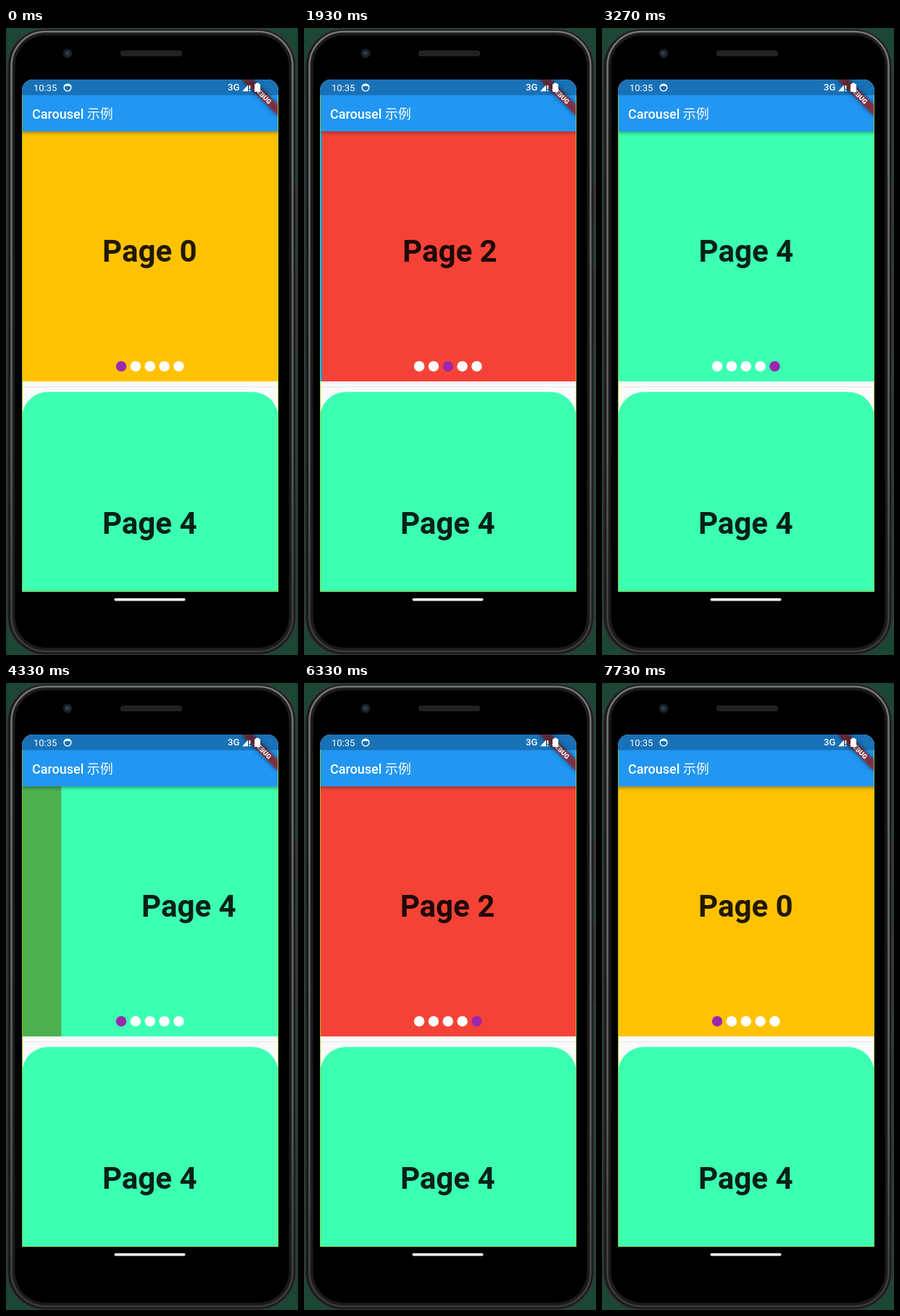
Animation, 403 px wide and 864 px high, one loop 8 s. Source, as an HTML page:

```html
<!DOCTYPE html>
<html lang="zh">
<head>
<meta charset="utf-8">
<title>Carousel</title>
<style>
  html, body { margin: 0; width: 100%; height: 100%; overflow: hidden; background: #1d4735; }
  svg { display: block; width: 403px; height: 864px; }
  text { font-family: Roboto, "Noto Sans CJK SC", "Noto Sans CJK", sans-serif; fill: #fff; }
  .page { font-size: 42px; font-weight: 700; text-anchor: middle; fill: #000; fill-opacity: .87; }
  .blur { filter: blur(3px); }
</style>
</head>
<body>
<svg viewBox="0 0 403 864">
  <defs>
    <clipPath id="view"><rect x="22" y="142" width="354" height="345"/></clipPath>
    <clipPath id="screen"><path d="M22 777V86a15 15 0 0 1 15-15H361a15 15 0 0 1 15 15V777z"/></clipPath>
    <linearGradient id="shade" x2="0" y2="1">
      <stop stop-opacity=".34"/><stop offset=".4" stop-opacity=".12"/><stop offset="1" stop-opacity="0"/>
    </linearGradient>
    <linearGradient id="metal" x2="0" y2="1">
      <stop stop-color="#77777c"/><stop offset=".7" stop-color="#5c5c60"/><stop offset="1" stop-color="#3a3a3c"/>
    </linearGradient>
    <path id="ribbon" d="M325 71H340.400L376 106.600V122z"/>
  </defs>

  <!-- phone -->
  <g fill="#3b3635">
    <rect x="398" y="217" width="5" height="56" rx="1.5"/>
    <rect x="398" y="331" width="5" height="112" rx="1.5"/>
  </g>
  <rect x="2" y="1.5" width="398" height="862" rx="52" fill="#1b1b1c" stroke="#343436" stroke-width="1.5"/>
  <rect x="7.5" y="5" width="388" height="854" rx="47" fill="none" stroke="url(#metal)" stroke-width="2.5"/>
  <rect x="12.500" y="10" width="378" height="844" rx="42"/>
  <circle cx="85" cy="35" r="6.5" fill="#1a1c20"/>
  <circle cx="85" cy="35" r="4" fill="#222c3a"/>
  <circle cx="84.5" cy="34.5" r="1.6" fill="#34506f"/>
  <rect x="158" y="31" width="85" height="8" rx="3.5" fill="#222223"/>
  <rect x="149.5" y="785.7" width="98" height="3.8" rx="1.9" fill="#f4f4f4"/>

  <g clip-path="url(#screen)">
    <rect x="22" y="71" width="354" height="706" fill="#fafafa"/>
    <g clip-path="url(#view)"><g id="strip"></g></g>
    <g id="dots"></g>
    <path d="M22 494.5H376" stroke="#e6e6e6"/>
    <path d="M22 777V537.500a36 36 0 0 1 36-36H340a36 36 0 0 1 36 36V777z" fill="#3cffb2"/>
    <text class="page" x="198.3" y="696.5">Page 4</text>

    <rect x="22" y="142.5" width="354" height="6.5" fill="url(#shade)"/>
    <rect x="22" y="71" width="354" height="71.5" fill="#2196f3"/>
    <text x="36" y="125" font-size="18" font-weight="500">Carousel 示例</text>

    <use href="#ribbon" class="blur" fill-opacity=".5"/>
    <use href="#ribbon" fill="#b71c1c" fill-opacity=".63"/>
    <text transform="translate(354.4 92.6) rotate(45)" y="3.3" font-size="9.2" font-weight="900" text-anchor="middle">DEBUG</text>

    <rect x="22" y="71" width="354" height="21.5" fill-opacity=".25"/>
    <text x="38" y="87" font-size="13">10:35</text>
    <circle cx="85" cy="82" r="4.9" fill="none" stroke="#fff" stroke-width="1.4"/>
    <path d="M80.5 81a4.8 4.8 0 0 1 9 0q-4.500-2.500-9 0z" fill="#fff"/>
    <text x="306" y="86.300" font-size="13" font-weight="500">3G</text>
    <path d="M326 87.200L334 78.500V87.200zM335.500 79h1.800v5h-1.800zM335.500 85.300h1.800v1.900h-1.800zM345 77V75.800h4V77h1a1 1 0 0 1 1 1V87a1 1 0 0 1-1 1H344a1 1 0 0 1-1-1V78a1 1 0 0 1 1-1z" fill="#fff"/>
    <path d="M22.500 92V776.500H375.500V92" fill="none" stroke="#a0cc28" stroke-opacity=".85"/>
  </g>
</svg>
<script>
const NS = 'http://www.w3.org/2000/svg';
const LOOP = 8000, FPS = 15, LEFT = 22.3, WIDTH = 353.3;
const colors = ['#ffc203', '#2196f3', '#f44336', '#4caf50', '#3cffb2'];

// Finger swipes settle like a spring (rate per second); timed moves ease for 300 ms.
const moves = [
  { start: 510, end: 1200, from: 0, to: 1, rate: 11 },
  { start: 1380, end: 1930, from: 1, to: 1.9915, rate: 14 },
  { start: 2040, end: 2530, from: 1.9915, to: 3, rate: 15 },
  { start: 2630, end: 3465, from: 3, to: 4, rate: 14 },
  { start: 4316.7, end: 4616.7, from: 4, to: 0 },
  { start: 5299.8, end: 5599.8, from: 0, to: 2 },
  { start: 6333, end: 6633, from: 2, to: 4 },
  { start: 7385, end: 7685, from: 4, to: 0 }
];

function add(parent, tag, attrs, text = '') {
  const el = document.createElementNS(NS, tag);
  for (const key in attrs) el.setAttribute(key, attrs[key]);
  el.textContent = text;
  return parent.appendChild(el);
}

const strip = document.getElementById('strip');
colors.forEach((fill, i) => {
  const x = LEFT + i * WIDTH;
  add(strip, 'rect', { x: x - (i ? 0 : 1), y: 142, width: WIDTH + 1, height: 345, fill });
  add(strip, 'text', { class: 'page', x: x + WIDTH / 2 - .6, y: 321.5 }, 'Page ' + i);
});
const dotBox = document.getElementById('dots');
const dots = colors.map((_, i) => add(dotBox, 'circle', { cx: 159 + i * 19.85, cy: 466.2, r: 7.2 }));

function spring(x) { return 1 - (1 + x) * Math.exp(-x); }

// cubic-bezier(.25, .1, .25, 1)
function ease(x) {
  let lo = 0, hi = 1;
  for (let i = 0; i < 24; i++) {
    const s = (lo + hi) / 2;
    if (.75 * s * (1 - s) + s ** 3 < x) lo = s; else hi = s;
  }
  return .3 * (1 - lo) ** 2 * lo + 3 * (1 - lo) * lo * lo + lo ** 3;
}

function stateAt(t) {
  const m = moves.filter(m => t >= m.start).pop();
  if (!m) return { pos: 0, dot: 0 };
  if (t >= m.end) return { pos: m.to, dot: Math.round(m.to) };
  const age = t - m.start;
  const p = m.rate ? spring(age / 1000 * m.rate) : ease(age / (m.end - m.start));
  const pos = m.from + (m.to - m.from) * p;
  // A timed move marks its goal first, then each page it passes.
  const early = !m.rate && Math.abs(pos - m.from) < .5;
  return { pos, dot: early ? m.to : Math.round(pos) };
}

function draw(now) {
  const frame = Math.floor((now % LOOP + 5) * FPS / 1000);
  const { pos, dot } = stateAt(frame * 1000 / FPS);
  strip.setAttribute('transform', `translate(${-pos * WIDTH} 0)`);
  dots.forEach((d, i) => d.setAttribute('fill', i === dot ? '#9c27b0' : '#fff'));
}

const began = performance.now();
function tick() {
  draw(performance.now() - began);
  requestAnimationFrame(tick);
}
tick();
</script>
</body>
</html>
```
